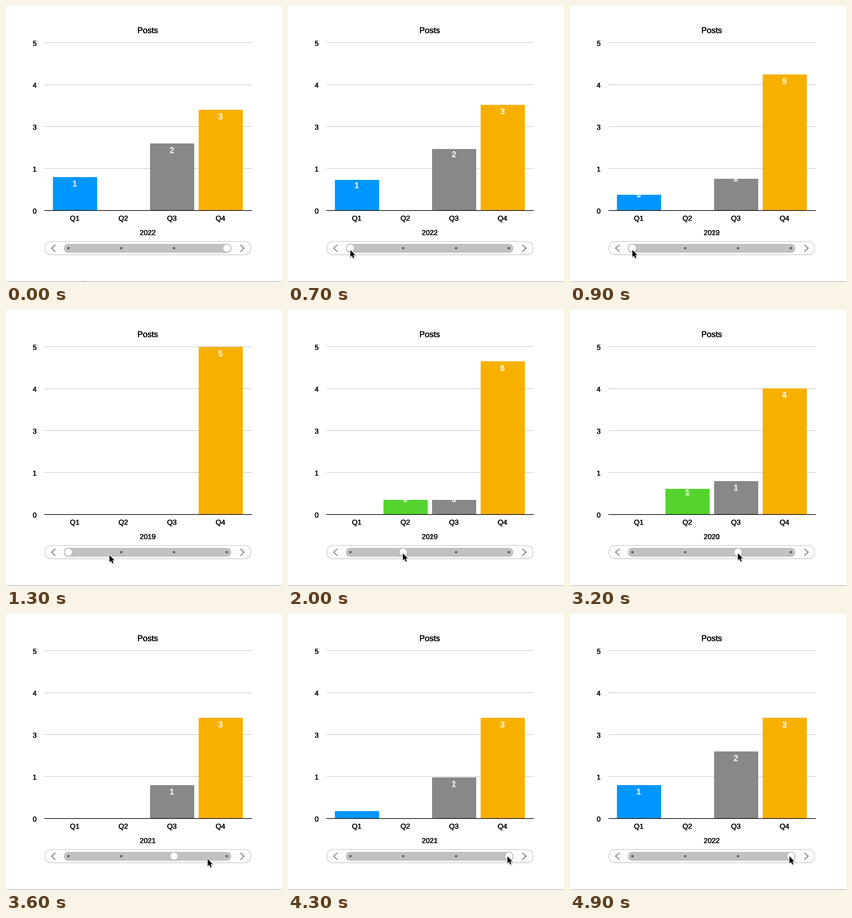
Animation, 500 px wide and 500 px high, one loop 5.5 s. Source, as a matplotlib script:

```python
import math

import numpy as np
import matplotlib.pyplot as plt
from matplotlib.animation import FuncAnimation
from matplotlib.patches import Circle, FancyBboxPatch, Polygon, Rectangle
from matplotlib.patheffects import withStroke

SIZE, DPI = 500, 100
STEP, LOOP = 100, 5500
PX = 72 / DPI  # points per pixel

BASE, UNIT = 370.8, 60.8
BAR_WIDTH, BAR_PITCH = 80, 88
BAR_COLORS = ["#0096ff", "#55d32f", "#888888", "#f8b000"]
POSTS = {
    "2019": (0, 0, 0, 5),
    "2020": (0, 1, 1, 4),
    "2021": (0, 0, 1, 3),
    "2022": (1, 0, 2, 3),
}
YEARS = list(POSTS)
STOPS = {year: 113 + 95.7 * i for i, year in enumerate(YEARS)}
SLIDER_Y = 438.7

# Each morph leads to the next year; the knob jumps shortly after its start.
MORPH_STARTS = (600, 1735, 3020, 4120)
MORPH_TIME, PRESS_DELAY = 580, 70

# Pointer glides: start, duration, end point, downward bow
POINTER_HOME = (139, 498)
GLIDES = [
    (0, 400, (113, 442), 0),
    (1100, 500, (208, 440.7), 5),
    (2300, 800, (304, 440.7), 0),
    (3420, 600, (397.5, 439), 5),
]
POINTER_SHAPE = np.array([
    (0, 0), (0, 12.6), (2.8, 10), (4.9, 14.8), (7.1, 13.9), (5.1, 9.2), (9, 9.2),
])

plt.rcParams["font.family"] = "Liberation Sans"
fig = plt.figure(figsize=(SIZE / DPI, SIZE / DPI), dpi=DPI, facecolor="white")
ax = fig.add_axes([0, 0, 1, 1])
ax.set(xlim=(0, SIZE), ylim=(SIZE, 0))
ax.axis("off")


def line(xs, ys, color, width=1.0, z=1):
    ax.plot(xs, ys, color=color, lw=width * PX, zorder=z, solid_capstyle="butt")


def text(x, baseline, string, size, color="black"):
    return ax.text(x, baseline, string, fontsize=size * PX, color=color,
                   ha="center", va="baseline", zorder=5,
                   path_effects=[withStroke(linewidth=0.25, foreground=color)])


def pill(x, y, w, h, face, edge="none", z=2):
    ax.add_patch(FancyBboxPatch(
        (x, y), w, h, boxstyle=f"round,pad=0,rounding_size={h / 2}",
        fc=face, ec=edge, lw=PX, zorder=z))


def mix(a, b, p):
    return a + (b - a) * p


def crossfade(pair, before, after, p):
    """Blend two overlaid texts; equal strings stay solid."""
    alphas = (1, 0) if before == after else (1 - p, p)
    for label, string, alpha in zip(pair, (before, after), alphas):
        label.set_text(string)
        label.set_alpha(alpha)


# Chart
text(256.7, 49, "Posts", 15)
for i, tick in enumerate("5431"):
    y = 66.3 + 76 * i
    line([69, 445], [y, y], "#c8c8c8")
    text(52, y + 5.7, tick, 13)
text(52, 376, "0", 13)
line([69, 445], [370.3, 370.3], "black", 1.2, 4)

bars, bar_labels = [], []
for i, color in enumerate(BAR_COLORS):
    left = 85 + BAR_PITCH * i
    middle = left + BAR_WIDTH / 2 - 0.5
    bars.append(ax.add_patch(
        Rectangle((left, BASE), BAR_WIDTH, 0, fc=color, lw=0, zorder=3)))
    bar_labels.append([text(middle, BASE, "", 15, "white") for _ in range(2)])
    text(middle, 389, f"Q{i + 1}", 13)
year_digits = [[text(256.7 + 7.2 * (i - 1.5), 415, "", 13) for _ in range(2)]
               for i in range(4)]

# Slider
pill(70.5, 427.3, 373, 24, "#d8d8d8")
pill(70.5, 426.5, 373, 24, "#fcfcfc", "#c6c6c6", 3)
pill(105, 431, 303, 16, "#c1c1c1", z=4)
for x, side in ((82.5, 1), (431.5, -1)):
    line([x + 7 * side, x, x + 7 * side], [432.5, SLIDER_Y, 445], "#7c7c7c", 1.6, 5)
for x in STOPS.values():
    ax.add_patch(Circle((x, SLIDER_Y), 2.1, fc="#555555", lw=0, zorder=5))
knob = ax.add_patch(Circle((0, SLIDER_Y), 7.3, fc="white", ec="#a0a0a0",
                           lw=0.9 * PX, zorder=6))

line([0, SIZE], [499.3, 499.3], "#a8a8a8")

# Pointer layers: shadow, outline, body
pointer = [
    (ax.add_patch(Polygon(POINTER_SHAPE, fc=color, ec=color, lw=width * PX,
                          alpha=alpha, zorder=8)), shift)
    for color, width, alpha, shift in (("black", 2.4, 0.2, (0.4, 1)),
                                       ("white", 2.0, 1, (0, 0)),
                                       ("black", 0, 1, (0, 0)))
]


def morph(t):
    """Return the two blended years and the blend amount."""
    before = after = YEARS[-1]
    p = 1.0
    for start, year in zip(MORPH_STARTS, YEARS):
        if t >= start + PRESS_DELAY:
            before, after = after, year
            u = min((t - start) / MORPH_TIME, 1)
            p = u * u * (3 - 2 * u)
    return before, after, p


def pointer_tip(t):
    x, y = POINTER_HOME
    for start, duration, (end_x, end_y), bow in GLIDES:
        u = min(max((t - start) / duration, 0), 1)
        p = 1 - (1 - u) ** 3
        x = mix(x, end_x, p)
        y = mix(y, end_y, p) + bow * math.sin(math.pi * p)
    return np.array([x, y])


def update(frame):
    t = frame * STEP
    before, after, p = morph(t)
    knob.center = STOPS[after], SLIDER_Y

    for bar, pair, old, new in zip(bars, bar_labels, POSTS[before], POSTS[after]):
        height = UNIT * mix(old, new, p)
        bar.set_y(BASE - height)
        bar.set_height(height)
        # Labels sit inside filled bars and above empty ones.
        inset = mix(*(17 if value else -7 for value in (old, new)), p)
        crossfade(pair, str(old), str(new), p)
        for label in pair:
            label.set_y(BASE - height + inset)

    for pair, old, new in zip(year_digits, before, after):
        crossfade(pair, old, new, p)

    tip = pointer_tip(t)
    for layer, shift in pointer:
        layer.set_xy(POINTER_SHAPE + tip + shift)


anim = FuncAnimation(fig, update, frames=LOOP // STEP, interval=STEP,
                     init_func=lambda: update(0), repeat=True, repeat_delay=0)
plt.show()
```
